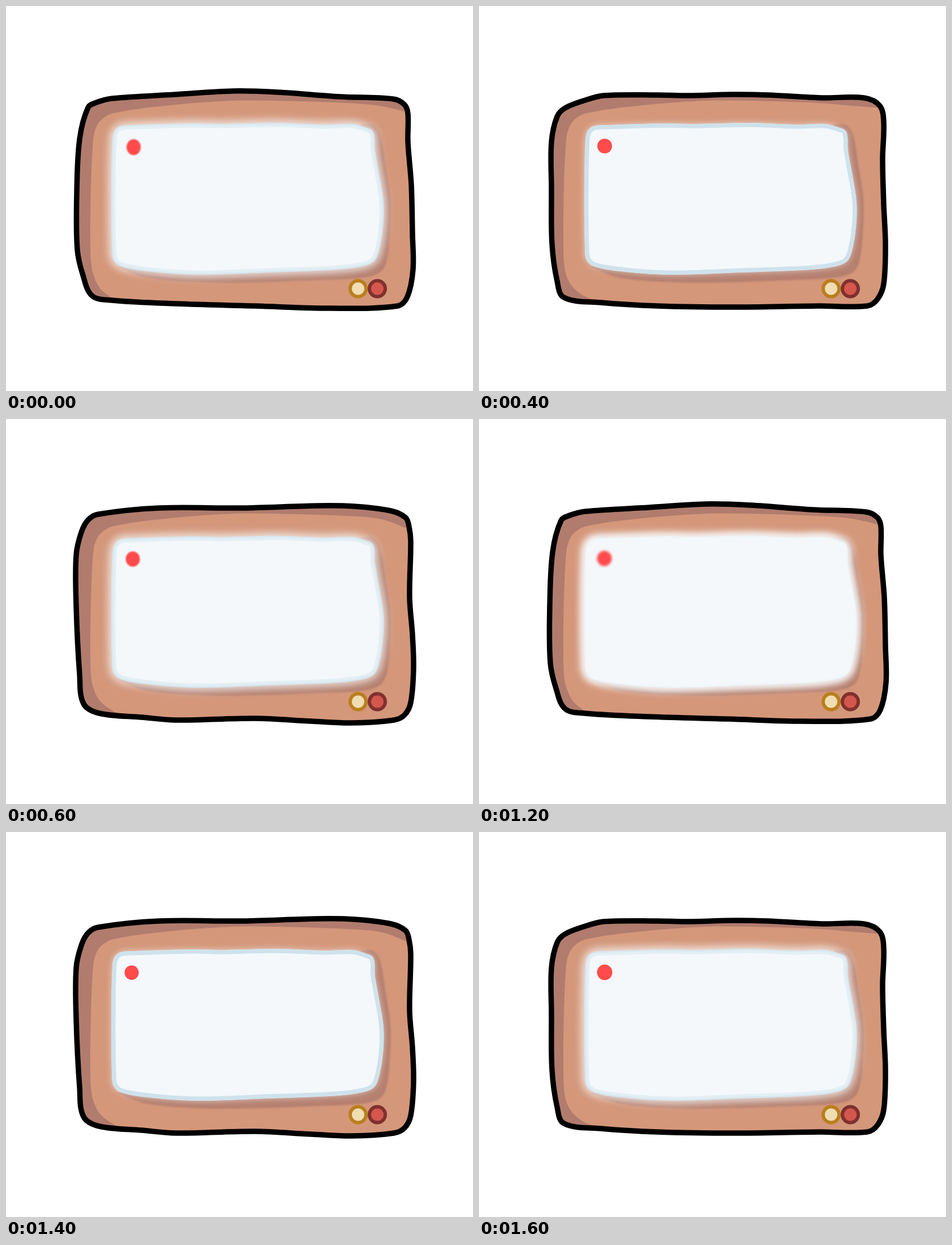
Write an HTML page with a canvas that moves like this. It is 825 px wide and 679 px high and loops after 1800 ms.

```html
<!DOCTYPE html>
<html lang="en">
<head>
<meta charset="utf-8">
<title>Television</title>
<style>
  html, body { margin: 0; width: 100%; height: 100%; overflow: hidden; background: #fff; }
  canvas { display: block; }
</style>
</head>
<body>
<canvas id="stage" width="825" height="679"></canvas>
<script>
const ctx = document.getElementById('stage').getContext('2d');
const LOOP = 1800;

// Hand-drawn case outlines, with the two ends of the lit front face
const caseA = {
  outline: [[145,179],[160,170],[188,163],[300,156],[400,150],[480,152],[590,160],[684,164],
    [704,174],[710,190],[710,240],[716,315],[718,400],[719,465],[709,513],[692,529],[570,533],
    [440,529],[300,525],[187,519],[152,511],[136,475],[126,430],[125,330],[130,235]],
  faceStart: [[194,520],[170,502]], faceEnd: [712,188]
};
const caseB = {
  outline: [[138,195],[152,180],[185,167],[220,158],[316,157],[370,158],[450,156],[510,157],
    [605,162],[680,162],[708,176],[715,205],[713,270],[715,350],[718,420],[715,490],[704,517],
    [686,529],[600,529],[450,531],[315,529],[215,523],[150,514],[138,485],[129,420],[128,320],[128,240]],
  faceStart: [[206,520],[180,508]], faceEnd: [712,180]
};
const caseC = {
  outline: [[124,240],[133,200],[145,178],[163,168],[270,157],[420,157],[550,153],[615,154],
    [680,162],[706,174],[712,190],[715,215],[713,315],[718,380],[720,440],[715,500],[704,522],
    [685,531],[610,536],[540,533],[440,528],[300,531],[240,526],[165,519],[137,502],[130,450],[124,330]],
  faceStart: [[200,522],[172,503]], faceEnd: [714,195]
};

const faceEdge = [[160,488],[151,460],[149,400],[150,320],[153,250],[157,220],[168,201],
  [190,189],[280,176],[400,167],[520,168],[600,171],[660,176]];

const screen = smooth([[188,235],[192,220],[202,212],[225,210],[330,207],[380,208],[480,206],
  [560,209],[612,208],[635,214],[649,222],[652,255],[660,300],[667,345],[666,390],[658,435],
  [648,452],[620,461],[570,466],[460,470],[340,474],[260,469],[205,460],[190,448],[187,425],[186,330]], true);

const screenShadow = smooth([[628,209],[648,210],[660,225],[670,280],[679,340],[678,400],
  [672,450],[660,470],[630,479],[560,483],[400,488],[300,485],[240,477],[198,460]]);

// Screen light: halo spread and strength, opacity of the wide and thin blue rims
const dim = { spread: 0, blur: 6, halo: .6, rim: 1, line: 0 };
const lit = { spread: 6, blur: 8, halo: .9, rim: .45, line: .5 };
const bright = { spread: 14, blur: 7, halo: 1, rim: 0, line: .12 };

const poses = [
  { until: 400, shell: caseA, light: lit, dot: [225.5, 249, 12.5, 14, 1] },
  { until: 600, shell: caseB, light: dim, dot: [222, 247, 13, 13, .3] },
  { until: 1200, shell: caseC, light: lit, dot: [224, 247, 12.5, 13.5, .8] },
  { until: 1400, shell: caseA, light: bright, dot: [221.5, 246, 13, 13.5, 2.3] },
  { until: 1600, shell: caseC, light: dim, dot: [222, 248, 12.5, 12.7, 0] },
  { until: LOOP, shell: caseB, light: lit, dot: [222, 247.5, 13.5, 13.8, .3] }
];

// Smooth path through points, with handles scaled to each segment
function smooth(points, closed = false) {
  const n = points.length;
  const at = i => closed ? points[(i + n) % n] : points[Math.max(0, Math.min(n - 1, i))];
  const direction = i => {
    const [x0, y0] = at(i - 1), [x1, y1] = at(i + 1);
    const length = Math.hypot(x1 - x0, y1 - y0);
    return [(x1 - x0) / length, (y1 - y0) / length];
  };
  const path = new Path2D();
  path.moveTo(...points[0]);
  for (let i = 0; i < (closed ? n : n - 1); i++) {
    const [x0, y0] = at(i), [x1, y1] = at(i + 1);
    const reach = Math.hypot(x1 - x0, y1 - y0) / 3;
    const [ax, ay] = direction(i), [bx, by] = direction(i + 1);
    path.bezierCurveTo(x0 + ax * reach, y0 + ay * reach, x1 - bx * reach, y1 - by * reach, x1, y1);
  }
  if (closed) path.closePath();
  return path;
}

function layer(settings, draw) {
  ctx.save();
  Object.assign(ctx, settings);
  draw();
  ctx.restore();
}

function ellipse(x, y, rx, ry) {
  ctx.beginPath();
  ctx.ellipse(x, y, rx, ry, 0, 0, 2 * Math.PI);
}

function drawCase({ outline, faceStart, faceEnd }) {
  const shell = smooth(outline, true);
  const face = smooth([...faceStart, ...faceEdge, faceEnd]);
  face.lineTo(760, 580);
  face.lineTo(200, 580);
  layer({ fillStyle: '#b17c6e' }, () => {
    ctx.clip(shell);
    ctx.fillRect(0, 0, 825, 679);
    ctx.fillStyle = '#d4977a';
    ctx.fill(face);
  });
  layer({ strokeStyle: '#000', lineWidth: 9.5, lineJoin: 'round' }, () => ctx.stroke(shell));
}

function drawScreen({ spread, blur, halo, rim, line }) {
  layer({ fillStyle: '#b17c6e', globalAlpha: .85, filter: 'blur(1.5px)' }, () => ctx.fill(screenShadow));
  layer({ fillStyle: '#f8fafb', strokeStyle: '#f8fafb', lineWidth: spread || 1,
          globalAlpha: halo, filter: `blur(${blur}px)` }, () => {
    const glow = new Path2D(screen);
    ctx.fill(glow);
    if (spread) ctx.stroke(glow);
  });
  layer({ fillStyle: '#f4f8fb', strokeStyle: '#cfe2ec' }, () => {
    ctx.clip(screen);
    ctx.fill(screen);
    for (const [width, alpha] of [[15, rim], [6, line]]) {
      ctx.lineWidth = width;
      ctx.globalAlpha = alpha;
      ctx.stroke(screen);
    }
  });
}

function drawKnob(x, fill, ring) {
  layer({ fillStyle: fill, strokeStyle: ring, lineWidth: 6 }, () => {
    ellipse(x, 498.5, 14, 14);
    ctx.fill();
    ctx.stroke();
  });
}

function drawDot([x, y, rx, ry, blur]) {
  layer({ fillStyle: '#ff4b4b', filter: blur ? `blur(${blur}px)` : 'none' }, () => {
    ellipse(x, y, rx, ry);
    ctx.fill();
  });
}

let shown;
function render() {
  const time = performance.now() % LOOP;
  const pose = poses.find(p => time < p.until);
  if (pose !== shown) {
    shown = pose;
    ctx.fillStyle = '#fff';
    ctx.fillRect(0, 0, 825, 679);
    drawCase(pose.shell);
    drawScreen(pose.light);
    drawKnob(622, '#f0ddb3', '#b97f1d');
    drawKnob(656, '#d4574d', '#7f312e');
    drawDot(pose.dot);
  }
  requestAnimationFrame(render);
}
render();
</script>
</body>
</html>
```
